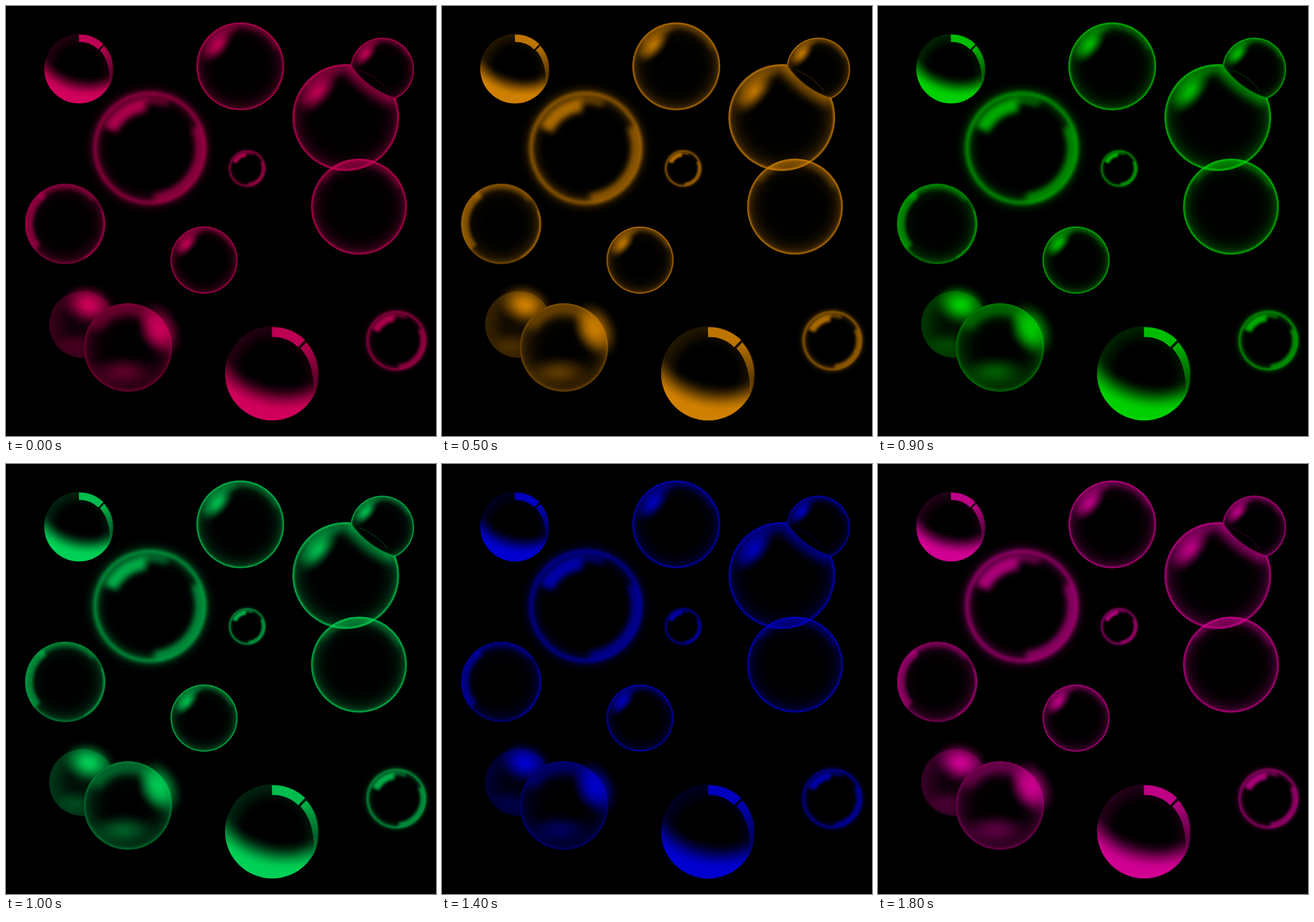
An HTML page with a canvas for the animation above (1.9 s loop, 748 by 748 pixels).

```html
<!DOCTYPE html>
<html>
<head>
<meta charset="utf-8">
<style>
html, body { margin: 0; background: #000; overflow: hidden; }
canvas { display: block; }
</style>
</head>
<body>
<canvas width="748" height="748"></canvas>
<script>
const SIZE = 748, STEP = 100, STEPS = 19;
const screenCtx = document.querySelector('canvas').getContext('2d');
const art = document.createElement('canvas');
art.width = art.height = SIZE;
const c = art.getContext('2d');
const rad = deg => deg * Math.PI / 180;
const white = a => `rgba(255,255,255,${a})`;
const bump = (x, mid, width) => Math.exp(-(((x - mid) / width) ** 2));
const smooth = (x, from, to) => {
  const t = Math.min(1, Math.max(0, (x - from) / (to - from)));
  return t * t * (3 - 2 * t);
};

// Draws in a space where the bubble has radius 1.
function within(x, y, r, draw) {
  c.save();
  c.translate(x, y);
  c.scale(r, r);
  draw();
  c.restore();
}

function circle(x = 0, y = 0, r = 1) {
  const p = new Path2D();
  p.arc(x, y, r, 0, 7);
  return p;
}

// Radial gradient whose opacity follows profile(distance).
function radial(profile, end, x = 0, y = 0) {
  const g = c.createRadialGradient(x, y, 0, x, y, end);
  for (let i = 0; i <= 60; i++) g.addColorStop(i / 60, white(profile(end * i / 60)));
  return g;
}

function disc(profile, end = 1) {
  c.fillStyle = radial(profile, end);
  c.fill(circle(0, 0, end));
}

function blob(x, y, rx, ry, angle, a) {
  c.save();
  c.translate(x, y);
  c.rotate(rad(angle));
  c.scale(rx, ry);
  disc(d => a * (1 - smooth(d, 0, 1)));
  c.restore();
}

function stroke(path, width, blur, a) {
  c.save();
  if (blur) c.filter = `blur(${blur * c.getTransform().a}px)`;
  c.lineWidth = width;
  c.strokeStyle = white(a);
  c.stroke(path);
  c.restore();
}

function streak(r, from, to, width, a, blur = .055) {
  const p = new Path2D();
  p.arc(0, 0, r, rad(from), rad(to));
  stroke(p, width, blur, a);
}

function rim() {
  disc(r => .4 * r ** 7 + .42 * bump(r, .98, .022));
  c.clip(circle());
  streak(.93, 215, 335, .12, .3);
}

function glassBubble(x, y, r) {
  within(x, y, r, () => {
    rim();
    blob(-.52, -.49, .58, .29, -50, .85);
    streak(.86, 200, 265, .12, .3);
  });
}

function glowBubble(x, y, r) {
  within(x, y, r, () => {
    disc(d => .33 * bump(d, .98, .05) + .24 * bump(d, .97, .12), 1.25);
    streak(.89, -25, 85, .14, .65);
    streak(.78, 205, 265, .25, .8);
    streak(.86, 262, 292, .14, .45);
  });
}

function ball(x, y, r) {
  within(x, y, r, () => {
    disc(d => .15 * smooth(d, .55, 1));
    c.fillStyle = radial(d => .97 * smooth(d, 1.5, 2.12), 2.4, .3, -1.3);
    c.fill(circle());
    // window reflection: a block, then a tapering sliver
    const block = new Path2D();
    block.arc(.02, -.005, .87, rad(-91.5), rad(-46));
    stroke(block, .21, 0, .87);
    const fade = c.createLinearGradient(.6, -.65, .88, .41);
    fade.addColorStop(0, white(.85));
    fade.addColorStop(1, white(.2));
    c.beginPath();
    c.arc(0, 0, .975, rad(-42), rad(25));
    c.quadraticCurveTo(.9, -.2, .6, -.53);
    c.fillStyle = fade;
    c.fill();
  });
}

function crescentBubble(x, y, r) {
  within(x, y, r, () => {
    disc(d => .38 * d ** 6 + .15 * bump(d, .97, .03));
    c.clip(circle());
    streak(.9, 140, 235, .2, .5, .04);
    streak(.93, 225, 320, .12, .4);
    streak(.97, -20, 60, .05, .45, .02);
  });
}

function cluster() {
  const seam = 'M599 103Q630 146 678 161', curve = new Path2D(seam);
  const upper = new Path2D(seam + 'H748V0H599Z');
  const lower = new Path2D('M0 0H748V748H0Z');
  const big = circle(591, 194, 93);
  lower.addPath(upper);

  c.save();
  c.clip(upper);
  glassBubble(654.5, 110.5, 55.5);
  stroke(new Path2D('M615 111Q645 122 664 148'), 1.5, 0, .2);
  c.restore();

  c.save();
  c.clip(lower, 'evenodd');
  glassBubble(591, 194, 93);
  c.clip(big);
  stroke(curve, 28, 8, .55);
  c.restore();
  stroke(curve, 2, .8, .4);

  within(614, 349, 83.5, rim);
  c.save();
  c.clip(circle(614, 349, 83.5));
  c.fillStyle = white(.2);
  c.fill(big);
  c.restore();
}

function softPair() {
  within(133, 554, 58, () => disc(d => .08 + .16 * smooth(d, .3, 1)));
  blob(144, 520, 52, 40, 15, .95);
  blob(122, 588, 42, 26, 0, .2);
  c.fillStyle = '#000';
  c.fill(circle(212, 594, 77));
  blob(268, 563, 40, 58, -25, .8);
  within(212, 594, 77, () => {
    disc(d => .32 * d ** 4 + .15 * bump(d, .98, .03));
    c.clip(circle());
    streak(.86, -150, -30, .25, .42, .1);
    blob(-.1, .55, .85, .42, 0, .4);
    blob(.66, -.4, .5, .6, -30, .55);
  });
}

c.fillStyle = '#000';
c.fillRect(0, 0, SIZE, SIZE);
ball(127, 109, 60.5);
ball(463, 639, 82);
glassBubble(407.5, 105, 76.5);
glassBubble(344.5, 442, 58.5);
glowBubble(250, 247, 97);
glowBubble(419.5, 282.5, 31);
glowBubble(679, 582, 51);
crescentBubble(103, 379, 70);
cluster();
softPair();

// [step, hue] key points, hue moving evenly between them
const hues = [[0, -26], [2, -2], [5, 37], [9, 120], [12, 193], [14, 240], [18, 318]];

function hueAt(step) {
  const i = Math.max(1, hues.findIndex(([s]) => s >= step));
  const [s0, h0] = hues[i - 1], [s1, h1] = hues[i];
  return h0 + (h1 - h0) * (step - s0) / (s1 - s0);
}

const start = performance.now();
function frame() {
  const step = Math.floor((performance.now() - start) / STEP) % STEPS;
  screenCtx.globalCompositeOperation = 'copy';
  screenCtx.drawImage(art, 0, 0);
  screenCtx.globalCompositeOperation = 'multiply';
  screenCtx.fillStyle = `hsl(${hueAt(step)}, 100%, 42%)`;
  screenCtx.fillRect(0, 0, SIZE, SIZE);
  requestAnimationFrame(frame);
}
frame();
</script>
</body>
</html>
```
